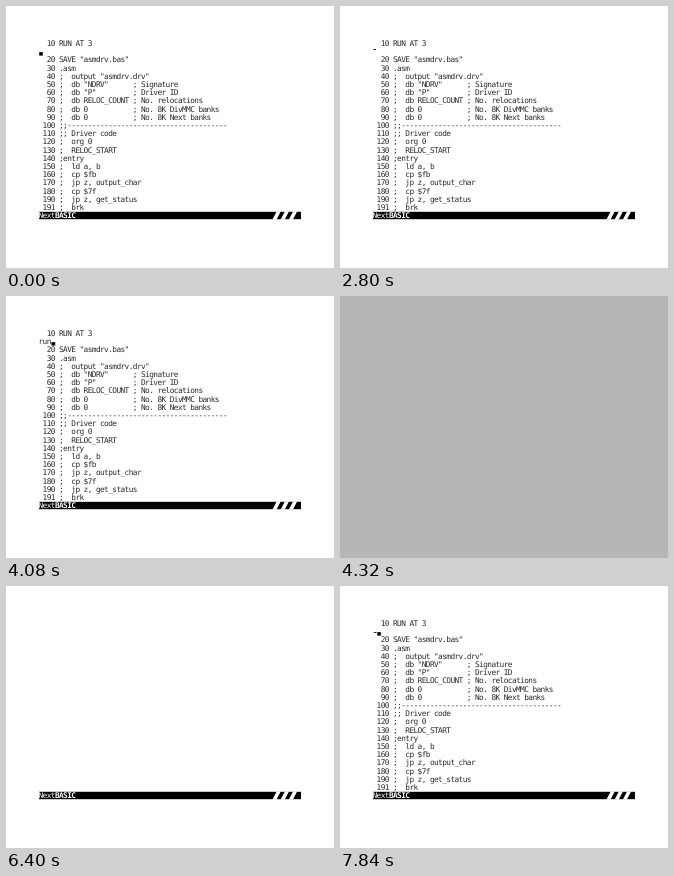
Animation, 328 px wide and 262 px high, one loop 8 s. Source, as an HTML page:

```html
<!DOCTYPE html>
<html lang="en">
<head>
<meta charset="utf-8">
<title>BASIC editor</title>
<style>
  html, body { margin: 0; width: 100%; height: 100%; overflow: hidden; background: #fff; }
  svg { display: block; width: 328px; height: 262px; }
  text {
    font-family: "DejaVu Sans Mono", monospace;
    font-size: 7.8px;
    fill: #2a2a2a;
    text-anchor: middle;
    white-space: pre;
    text-rendering: geometricPrecision;
  }
  .bar text { fill: #fff; }
  .bar .strong { font-weight: bold; }
  .report text { font-family: "DejaVu Sans", sans-serif; font-size: 8.4px; fill: #000; }

  .cursor, .tick, .letter, .cover, .runtime, .report { animation: 8s step-end infinite; }
  .cursor { animation-name: cursor; }
  .tick { animation-name: tick; }
  .letter { animation-name: first-letters; }
  .letter.last { animation-name: last-letter; }
  .cover { animation-name: redraw; }
  .runtime { animation-name: runtime; }
  .report { animation-name: report; }

  /* One percent is 80 ms. */
  @keyframes cursor {
    0%   { transform: none; opacity: 1; }
    35%  { transform: none; opacity: 0; }
    36%  { transform: translateX(8.2px); opacity: 1; }
    39%  { transform: translateX(12.3px); opacity: 1; }
    80%  { transform: none; opacity: 0; }
    84%  { transform: none; opacity: 1; }
    98%, 100% { transform: translateX(4.1px); opacity: 1; }
  }
  @keyframes tick {
    0%   { transform: none; opacity: 0; }
    35%  { transform: none; opacity: 1; }
    36%  { transform: none; opacity: 0; }
    98%, 100% { transform: translate(.5px, 3px); opacity: 1; }
  }
  @keyframes first-letters {
    0% { opacity: 0; } 36% { opacity: 1; } 80%, 100% { opacity: 0; }
  }
  @keyframes last-letter {
    0% { opacity: 0; } 39% { opacity: 1; } 80%, 100% { opacity: 0; }
  }
  @keyframes redraw {
    0%  { transform: translateY(300px); }
    80% { transform: none; }
    81% { transform: translateY(41px); }
    82% { transform: translateY(82px); }
    83% { transform: translateY(131px); }
    84%, 100% { transform: translateY(300px); }
  }
  @keyframes runtime {
    0% { opacity: 0; } 54% { opacity: 1; } 80%, 100% { opacity: 0; }
  }
  @keyframes report {
    0% { opacity: 0; } 66% { opacity: 1; } 80%, 100% { opacity: 0; }
  }
</style>
</head>
<body>
<svg viewBox="0 0 328 262">
  <rect width="328" height="262" fill="#fff"/>
  <g id="listing"></g>
  <g id="typed"></g>
  <rect class="cursor" x="33.2" y="46.1" width="3.6" height="3.5"/>
  <rect class="tick" x="33.6" y="43" width="2.2" height="1"/>
  <rect class="cover" y="33" width="328" height="172" fill="#fff"/>
  <g class="bar" id="bar">
    <rect x="33" y="205.8" width="262" height="7.4"/>
    <path fill="#fff" d="M266.5 213.4l4.1-8h4.1l-4.1 8zm8.2 0l4.1-8h4.1l-4.1 8zm8.2 0l4.1-8h4.1l-4.1 8z"/>
  </g>
  <rect class="runtime" width="328" height="262" fill="#b5b5b5"/>
  <g class="report" id="report">
    <path stroke="#000" stroke-width=".8" d="M35.3 227.8l3.2-4.3M101 227.8l3.2-4.3"/>
  </g>
</svg>
<script>
  const LEFT = 32.8, TOP = 33.2, ROW = 8.19, NARROW = 4.1, WIDE = 8.2, BASELINE = 6.9;

  // Puts each character in the middle of its own screen cell.
  function print(groupId, line, row, { col = 0, pitch = NARROW, className = "" } = {}) {
    const text = document.createElementNS("http://www.w3.org/2000/svg", "text");
    const cells = [...line].map((_, i) => (LEFT + (col + i + 0.5) * pitch).toFixed(2));
    text.setAttribute("x", cells.join(" "));
    text.setAttribute("y", TOP + row * ROW + BASELINE);
    text.setAttribute("class", className);
    text.textContent = line;
    document.getElementById(groupId).append(text);
  }

  const define = (value, note) => `;  db ${value.padEnd(12)}; ${note}`;

  const program = [
    [20, 'SAVE "asmdrv.bas"'],
    [30, ".asm"],
    [40, ';  output "asmdrv.drv"'],
    [50, define('"NDRV"', "Signature")],
    [60, define('"P"', "Driver ID")],
    [70, define("RELOC_COUNT", "No. relocations")],
    [80, define("0", "No. 8K DivMMC banks")],
    [90, define("0", "No. 8K Next banks")],
    [100, ";;" + "-".repeat(39)],
    [110, ";; Driver code"],
    [120, ";  org 0"],
    [130, ";  RELOC_START"],
    [140, ";entry"],
    [150, ";  ld a, b"],
    [160, ";  cp $fb"],
    [170, ";  jp z, output_char"],
    [180, ";  cp $7f"],
    [190, ";  jp z, get_status"],
    [191, ";  brk"],
  ];
  const numbered = ([number, code]) => `${String(number).padStart(4)} ${code}`;

  print("listing", numbered([10, "RUN AT 3"]), 0);
  program.forEach((entry, i) => print("listing", numbered(entry), i + 2));
  print("typed", "ru", 1, { className: "letter" });
  print("typed", "n", 1, { col: 2, className: "letter last" });
  print("bar", "Next", 21);
  print("bar", "BASIC", 21, { col: 4, className: "strong" });
  print("report", "0 OK, 540:1", 23, { pitch: WIDE });
</script>
</body>
</html>
```
